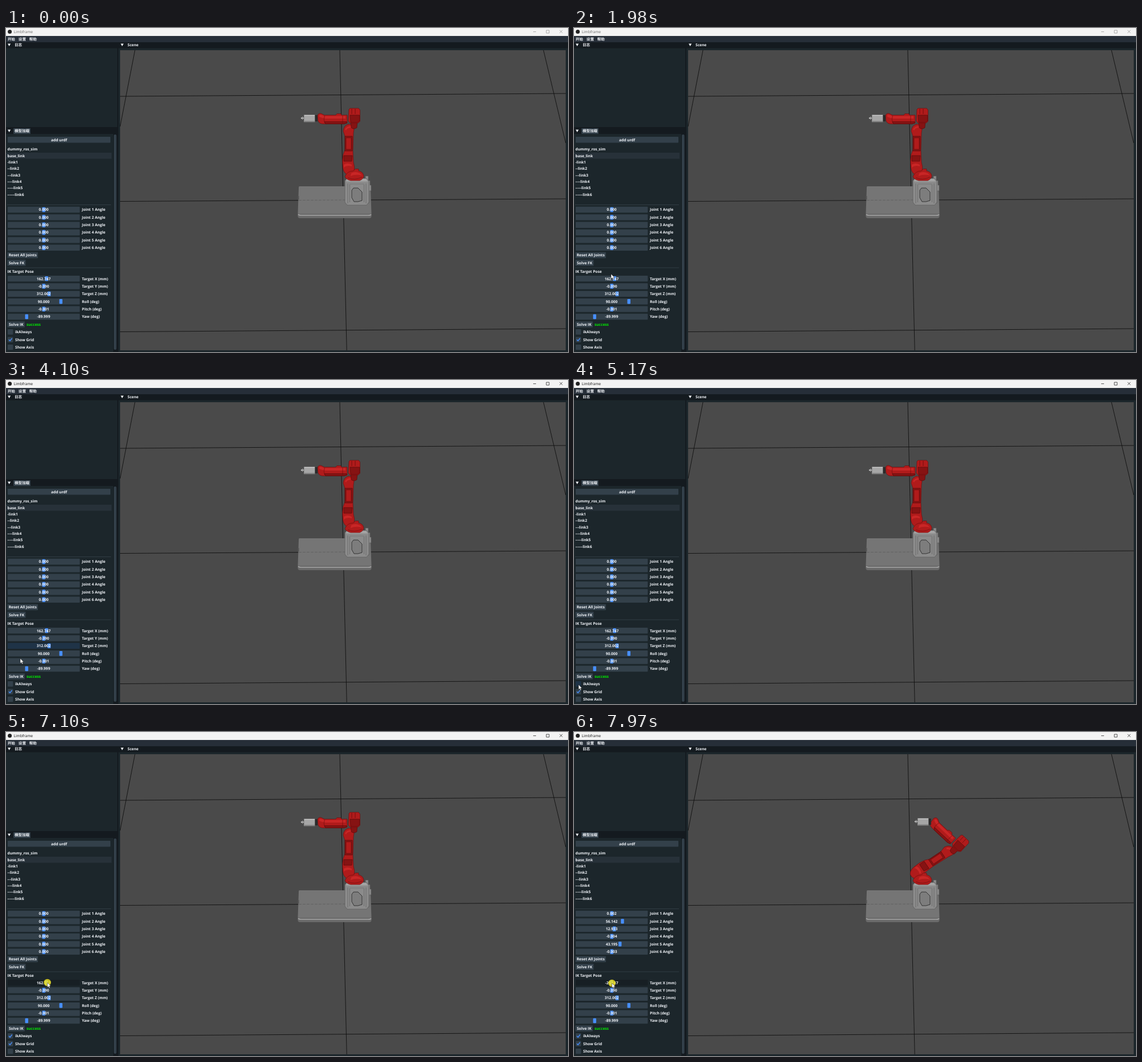
An HTML page that plays this animation: 985x569 px, repeating every 8000 ms.

```html
<!DOCTYPE html>
<html lang="zh">
<head>
<meta charset="utf-8">
<title>Limbframe</title>
<style>
  html, body { margin: 0; width: 100%; height: 100%; overflow: hidden; background: #1c262b; }
  svg { display: block; width: 985px; height: 569px; }
  text { font: 700 6.6px "Open Sans", "Noto Sans CJK SC", "Noto Sans CJK", sans-serif; fill: #f2f5fa; text-rendering: geometricPrecision; white-space: pre; }
  .mid { text-anchor: middle; }
  .box { fill: #33404a; }
  .box.hover { fill: #1f3347; }
  .box.active { fill: #171f24; }
  .button.hover { fill: #478fff; }
  .button.active { fill: #0f87fa; }
  .grab { fill: #478fff; }
  .rule { stroke: #3b474f; stroke-width: .7; }
  .app { font: 400 6.6px "Open Sans", sans-serif; fill: #666; }
  .controls { fill: none; stroke: #8c8c8c; stroke-width: .7; }
  .focused .app { fill: #111; }
  .focused .controls { stroke: #111; }
  #grid { stroke: #101010; stroke-width: .9; fill: none; }
  #robot { stroke-width: .6; stroke-linejoin: round; }
  .steel { fill: #8b8b8b; stroke: #555; }
  .red { fill: #b01b1b; stroke: #650d0d; }
  .deep { fill: #861313; stroke: #520909; }
  .lit { fill: #c92626; stroke: none; }
</style>
</head>
<body>
<svg viewBox="0 0 985 569">
  <rect width="985" height="569" fill="#1c262b"/>

  <g id="titlebar">
    <rect width="985" height="14" fill="#f3f3f3"/>
    <circle cx="6.6" cy="6.5" r="3.5" fill="#222"/>
    <text class="app" x="13.5" y="8.9">Limbframe</text>
    <path class="controls" d="M924 6.6h5M947 4h5v5h-5zM970.3 3.8l5 5m0-5l-5 5"/>
  </g>
  <rect y="14" width="985" height="11" fill="#262e38"/>
  <text x="2.7" y="22.2">开始</text>
  <text x="21.8" y="22.2">设置</text>
  <text x="40.7" y="22.2">帮助</text>

  <g fill="#141a1f">
    <rect y="25" width="195" height="10.5"/>
    <rect x="197" y="25" width="788" height="10.5"/>
    <rect y="174" width="195" height="12"/>
    <rect x="195" y="25" width="2" height="544"/>
    <rect x="188" y="186" width="7" height="383"/>
  </g>
  <rect x="13" y="176" width="30" height="10" rx="1" class="box"/>
  <rect x="189" y="187" width="4.5" height="378" rx="2" class="box"/>
  <path d="M3 27.5h5.2l-2.6 4.5zM3 178.5h5.2l-2.6 4.5zM201 27.5h5.2l-2.6 4.5z" fill="#f2f5fa"/>
  <text x="15" y="32.4">日志</text>
  <text x="15" y="183.3">模型加载</text>
  <text x="213" y="32.4">Scene</text>

  <rect y="219" width="185" height="10.6" fill="#273139"/>
  <path class="rule" d="M2 310.5H184M2 421H184"/>
  <g id="panel"></g>

  <rect x="200" y="39" width="781" height="527" fill="#4a4a4a"/>
  <path id="grid" d="M226 39L200 173M585 39L597.2 566M942 39L981 202M200 120L981 115M200 304.5L981 300M200 533.5L981 528"/>

  <g id="robot">
    <path d="M514 278H636Q639 278 639 281L640.5 326H511.5L513 281Q513 278 514 278Z" fill="#757575"/>
    <path d="M513 302.5L594 302" stroke="#555" stroke-dasharray="5 2"/>
    <path d="M511.5 326H640.5V331Q640 334 637 334H515Q512 334 511.5 331Z" fill="#6a6a6a"/>
    <path d="M512 327.5Q514 329 517 329H635Q639 329 640 327.5" fill="none" stroke="#a5a5a5" stroke-width="1.6"/>
    <path d="M511.5 295h2v6h-2z" fill="#555"/>
    <path class="steel" d="M630 260h5v8h3v8h2v10h-3v21h-8z"/>
    <path class="steel" d="M594 268L598 264H632L636 269V306L632 311H598L594 306Z"/>
    <path d="M597 265H631L634 269.5H596Z" fill="#a4a4a4"/>
    <path d="M599 273V308M602.5 275V306M627.5 275V306M631 273V308" stroke="#5a5a5a" fill="none"/>
    <path d="M609 281H617L624 288V303L617 305H610L606 298V285Z" fill="#7d7d7d" stroke="#333" stroke-width="1"/>
    <path d="M602 274H628" stroke="#666"/>

    <g id="upper">
      <path class="red" d="M590 240Q589 233 591 222L594 214V190L591 181Q592 171 600 169H609Q611 174 609 184L608 216L609 236Q612 245 610 252Q605 259 597 257Q590 253 590 240Z"/>
      <path class="deep" d="M594 190H607V216H594ZM592 224H607L606 234H592Z"/>
      <path class="red" d="M596 193H605V213H596Z"/>
      <path class="lit" d="M594 178Q597 172 605 172V175Q598 175 596 180ZM592 240Q598 236 606 240V243Q598 240 592 245Z"/>
    </g>
    <path class="red" d="M594 261Q598 251 609 251L612 247.5H618V251Q625 252 627 259Q627 265 620 268H604Q596 266 594 261Z"/>
    <path class="lit" d="M605 255Q612 251 620 255L624 259Q613 256 604 260Z"/>
    <path d="M599 263Q611 268 624 262" fill="none" stroke="#650d0d"/>

    <g id="fore">
      <path class="deep" d="M604 162H616L615 175Q610 179 605 175Z"/>
      <path class="red" d="M601 143L603 141H618L620.5 144V164L617 167H603L600 163Z"/>
      <path class="deep" d="M603 153H619.5V163.5L616 166H604ZM606 142V151M612 142V151"/>
      <path class="red" d="M546 154Q547 149.5 552 150L558 153H578L580 150.5H587L588 153H598V167L592 168.5H558Q549 169 547 163Z"/>
      <path class="lit" d="M549 153Q552 151 557 154.5H595V159H560Q553 158 549 156Z"/>
      <path class="deep" d="M558 164.5H597V167L592 168.5H560Z"/>
      <path d="M558.5 154Q556 160 558.5 167M590 154V167" fill="none" stroke="#650d0d"/>
    </g>
    <g id="tool">
      <rect x="517" y="157.3" width="5" height="2" fill="#ccc"/>
      <rect x="519" y="155.5" width="1.2" height="5.5" fill="#999"/>
      <path d="M541 153H546V164H541Z" fill="#2b2b2b"/>
      <rect x="522" y="152.3" width="19.5" height="13" fill="#a6a6a6" stroke="#555"/>
      <path d="M523 153.5H541" stroke="#ccc" stroke-width="1.2"/>
      <path d="M523 164H541" stroke="#777" stroke-width="1.2"/>
    </g>
  </g>

  <circle id="press" r="6.3" fill="#efe21c" opacity=".82"/>
  <path id="cursor" d="M0 0V8.6L2 6.8L3.4 9.9L4.8 9.3L3.4 6.3H6Z" fill="#fff" stroke="#111" stroke-width=".45"/>
</svg>

<script>
const LOOP = 8000, STEP = 66.4, FIRST = 590;
const $ = id => document.getElementById(id);
const panel = $('panel');
const targets = [];

function add(tag, attrs, text) {
  const el = document.createElementNS('http://www.w3.org/2000/svg', tag);
  for (const key in attrs) el.setAttribute(key, attrs[key]);
  if (text !== undefined) el.textContent = text;
  return panel.appendChild(el);
}
const label = (x, y, text, attrs = {}) => add('text', { x, y: y + 2.4, ...attrs }, text);

function box(x, y, width, height, kind = '') {
  const el = add('rect', { x, y: y - height / 2, width, height, rx: 1, class: 'box ' + kind });
  targets.push({ el, x, y, width, height });
  return el;
}

function button(x, y, width, text) {
  const el = box(x, y, width, 10.6, 'button');
  label(x + width / 2, y, text, { class: 'mid' });
  return el;
}

function slider(y, name, pxPerUnit, value) {
  const el = box(3, y, 126.3, 10.4);
  const grab = add('rect', { y: y - 4.2, width: 5.4, height: 8.4, rx: 1, class: 'grab' });
  const text = label(66, y, '', { class: 'mid' });
  label(133, y, name);
  const set = v => {
    grab.setAttribute('x', 63.5 + v * pxPerUnit);
    text.textContent = v.toFixed(3);
  };
  set(value);
  return { el, set };
}

function checkbox(y, name, on) {
  const el = box(3, y, 9.4, 9.4);
  const mark = add('path', { d: `M5 ${y}l2 2.3l3.6-4.6`, fill: 'none', stroke: '#478fff', 'stroke-width': 1.4 });
  mark.style.display = on ? '' : 'none';
  label(16, y, name);
  return { el, mark };
}

button(3, 196.3, 180, 'add urdf');
label(2.5, 213, 'dummy_ros_sim');
label(2.5, 224.3, 'base_link');
for (let i = 1; i <= 6; i++) label(2.5, 224.3 + i * 11.33, '-'.repeat(i) + 'link' + i);

const joints = [1, 2, 3, 4, 5, 6].map(n => slider(305.7 + n * 13.33, `Joint ${n} Angle`, 1 / 3, 0));
button(2.5, 399, 53.5, 'Reset All Joints');
const solveFk = button(2.5, 412.4, 32, 'Solve FK');
label(2.5, 428, 'IK Target Pose');
const pose = [
  ['Target X (mm)', .03, 162.747], ['Target Y (mm)', .03, -.09], ['Target Z (mm)', .03, 312.002],
  ['Roll (deg)', 1 / 3, 90], ['Pitch (deg)', 1 / 3, -.001], ['Yaw (deg)', 1 / 3, -89.999]
].map(([name, scale, value], i) => slider(440.1 + i * 13.37, name, scale, value));
button(2.5, 520.5, 30.5, 'Solve IK');
label(36, 520.5, 'success', { style: 'fill:#00f000' });
const always = checkbox(533.8, 'ikAlways', false);
checkbox(547.2, 'Show Grid', true);
checkbox(560.6, 'Show Axis', false);

// time, x, y of the pointer tip
const path = [
  [590, 857, 553], [656, 610, 540], [723, 400, 529], [790, 250, 520], [856, 160, 514], [922, 105, 509],
  [988, 84, 506], [1188, 84, 506], [1254, 81, 503.5], [1918, 66, 434.5], [1984, 65, 432], [2050, 62, 421],
  [2300, 50, 412], [2560, 34, 400], [2760, 22, 404], [2914, 20, 408], [3046, 17, 409], [3777, 17, 409],
  [3843, 18, 418], [4109, 25, 489], [4308, 20, 525], [4507, 11, 536], [5038, 11, 536], [5171, 8, 535],
  [6100, 8, 535], [6400, 40, 485], [6700, 72, 439], [6830, 72, 439], [6897, 72.5, 440], [7429, 72.5, 440],
  [7960, 66.5, 441]
];

function pointerAt(t) {
  const i = path.findIndex(p => p[0] >= t);
  if (i < 0) return path.at(-1).slice(1);
  if (i === 0) return path[0].slice(1);
  const [t0, x0, y0] = path[i - 1], [t1, x1, y1] = path[i];
  const f = (t - t0) / (t1 - t0);
  return [x0 + (x1 - x0) * f, y0 + (y1 - y0) * f];
}

const within = (t, from, to) => t >= from && t < to;
const DEG = Math.PI / 180;

function drawArm(k) {
  const shoulder = 56.142 * k;
  // the forearm tilts so that the tool keeps its height
  const tilt = Math.asin(1.546 * (1 - Math.cos(shoulder * DEG))) / DEG;
  const shift = `translate(${80 * k} ${-k})`;
  $('upper').setAttribute('transform', `rotate(${shoulder} 600 246)`);
  $('fore').setAttribute('transform', `${shift} rotate(${tilt} 550 159)`);
  $('tool').setAttribute('transform', shift);
  [.002 * k, shoulder, shoulder - tilt, -.004 * k, tilt - .014 * k, -.003 * k]
    .forEach((v, i) => joints[i].set(v));
  pose[0].set(162.747 - 187.934 * k);
}

function draw(t) {
  const q = FIRST + Math.floor((t - FIRST) / STEP + .17) * STEP;
  const shown = t >= FIRST;
  const [x, y] = pointerAt(q);
  const [hx, hy] = pointerAt(q - STEP);
  const pressed = within(t, 3370, 3510) || within(t, 5900, 5970) || t >= 7100;

  $('cursor').setAttribute('transform', `translate(${x} ${y})`);
  $('cursor').style.display = shown ? '' : 'none';
  $('press').setAttribute('transform', `translate(${x} ${y})`);
  $('press').style.display = pressed ? '' : 'none';
  $('titlebar').classList.toggle('focused', t >= 3370);
  always.mark.style.display = t >= 5970 ? '' : 'none';

  for (const b of targets) {
    const over = shown && within(hx, b.x, b.x + b.width) && Math.abs(hy - b.y) < b.height / 2;
    b.el.classList.toggle('hover', over);
  }
  solveFk.classList.toggle('active', within(t, 3370, 3510));
  pose[0].el.classList.toggle('active', t >= 7100);
  drawArm(Math.min(1, Math.max(0, (q - 7429) / 531)));
}

function frame() {
  draw(performance.now() % LOOP);
  requestAnimationFrame(frame);
}
frame();
</script>
</body>
</html>
```
